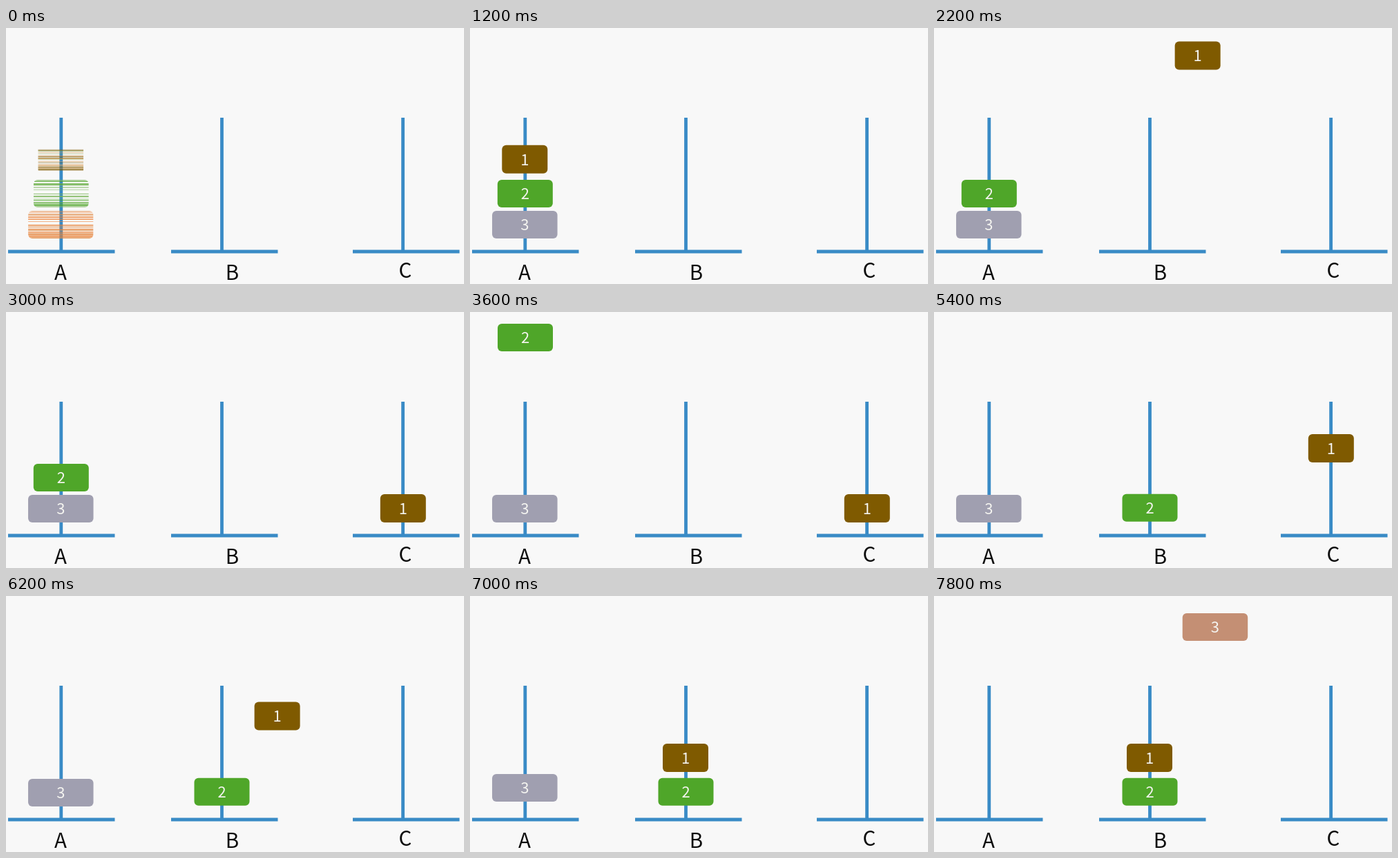
Write an HTML page that moves like this. It is 663 by 371 pixels and loops after 8000 ms.

```html
<!DOCTYPE html>
<html lang="en">
<head>
<meta charset="utf-8">
<title>Moving discs between three pegs</title>
<style>
  html, body { margin: 0; width: 100%; height: 100%; overflow: hidden; background: #f8f8f8; }
  svg { display: block; width: 663px; height: 371px; }
  text { font-family: "Noto Sans CJK SC", "Noto Sans", sans-serif; text-anchor: middle; }
  .peg { stroke: #398bc6; stroke-width: 4.8; fill: none; }
  .label { font-size: 29.5px; fill: #0b0b0b; }
  .digit { font-size: 22px; fill: #f4f4f0; }
</style>
</head>
<body>
<svg id="stage" viewBox="0 0 663 371"></svg>
<script>
const LOOP = 8000, STEP = 200, BARS_END = 500;
const GREY = [160, 159, 176], ORANGE = [237, 125, 49];
const stage = document.getElementById("stage");

function add(parent, tag, attrs, text) {
  const node = document.createElementNS(stage.namespaceURI, tag);
  for (const key in attrs) node.setAttribute(key, attrs[key]);
  if (text) node.textContent = text;
  return parent.appendChild(node);
}

const clamp = v => Math.min(1, Math.max(0, v));
const smooth = u => u * u * (3 - 2 * u);
const mix = (a, b, u) => a + (b - a) * u;
const noise = n => { const v = Math.sin(n * 127.1) * 43758.5453; return v - Math.floor(v); };

const pegs = [
  { name: "A", x: 79.8, base: 3, labelX: 79, labelY: 365 },
  { name: "B", x: 312.5, base: 239, labelX: 327.5, labelY: 365 },
  { name: "C", x: 574.6, base: 502, labelX: 578, labelY: 361.5 }
];
for (const p of pegs) {
  add(stage, "path", { class: "peg", d: `M${p.x} 130V324M${p.base} 324h154.5` });
  add(stage, "text", { class: "label", x: p.labelX, y: p.labelY }, p.name);
}

// Each move: start, end, target x, target y.
const discs = [
  { digit: "3", w: 94.5, h: 40, x: 79.3, y: 285, tints: ["#ed7d31", "#e08a45"], trim: [0, 0],
    moves: [[6950, 7450, 79.3, 35], [7495, 7995, 574, 50]] },
  { digit: "2", w: 80, h: 40, x: 79.8, y: 240, fill: "#4fa629", tints: ["#4fa629", "#78b456"], trim: [0, 0],
    moves: [[3100, 3600, 80, 37], [3650, 4150, 312.5, 37], [4170, 4610, 312.5, 283.7]] },
  { digit: "1", w: 66, h: 41, x: 79.3, y: 190.3, fill: "#7f5a00", tints: ["#7f5a00", "#8fa653", "#d59a52"], trim: [6, 4],
    moves: [[1350, 1850, 79.3, 37], [1913, 2413, 574.8, 42], [2480, 2980, 574.8, 284.6],
            [5200, 5700, 574.8, 37], [5800, 6433, 312, 234.5]] }
];

function build(disc, index) {
  const { w, h } = disc;
  const box = { x: -w / 2, y: -h / 2, width: w, height: h, rx: 6 };
  disc.group = add(stage, "g", {});
  add(add(disc.group, "clipPath", { id: "shape" + index }), "rect", box);
  disc.bars = add(disc.group, "g", { "clip-path": `url(#shape${index})` });
  disc.rows = Array.from({ length: h }, (_, i) => {
    const seed = i + index * 61 + 1;
    const fill = disc.tints[Math.floor(noise(seed + 300) * disc.tints.length)];
    return add(disc.bars, "rect", { x: -w / 2, y: -h / 2 + i, width: w, height: 1, fill });
  });
  disc.plate = add(disc.group, "rect", { ...box, fill: disc.fill || "none" });
  disc.text = add(disc.group, "text", { class: "digit", y: 8.2 }, disc.digit);
}
discs.forEach(build);

function place(disc, t) {
  let { x, y } = disc;
  for (const [start, end, toX, toY] of disc.moves) {
    if (t < start) break;
    const u = smooth(clamp((t - start) / (end - start)));
    x = mix(x, toX, u);
    y = mix(y, toY, u);
  }
  disc.group.setAttribute("transform", `translate(${x.toFixed(2)} ${y.toFixed(2)})`);
}

function drawBars(disc, index, t) {
  const [top, bottom] = disc.trim;
  const grown = t / BARS_END;
  disc.rows.forEach((row, i) => {
    const seed = i + index * 61 + 1;
    const edge = Math.abs(i / (disc.h - 1) - 0.5) * 2;
    const hidden = t < STEP && (i < top || i >= disc.h - bottom);
    const shown = !hidden && noise(seed) < 0.35 + 0.6 * edge + grown;
    row.setAttribute("opacity", shown ? clamp(0.3 + 0.6 * noise(seed + 150) + grown) : 0);
  });
}

function bottomColor(t) {
  const warmth = t < 4000 ? 1 - clamp((t - 400) / 600) : clamp((t - 7500) / 640);
  return `rgb(${GREY.map((c, i) => Math.round(mix(c, ORANGE[i], warmth)))})`;
}

function draw(now) {
  const t = Math.floor((now % LOOP) / STEP) * STEP;
  const entering = t < BARS_END;
  discs.forEach((disc, index) => {
    place(disc, t);
    disc.bars.setAttribute("display", entering ? "inline" : "none");
    disc.plate.setAttribute("display", entering ? "none" : "inline");
    disc.text.setAttribute("opacity", entering ? clamp(t / BARS_END) : 1);
    if (entering) drawBars(disc, index, t);
  });
  discs[0].plate.setAttribute("fill", bottomColor(t));
}

const begin = performance.now();
function tick() {
  draw(performance.now() - begin);
  requestAnimationFrame(tick);
}
tick();
</script>
</body>
</html>
```
